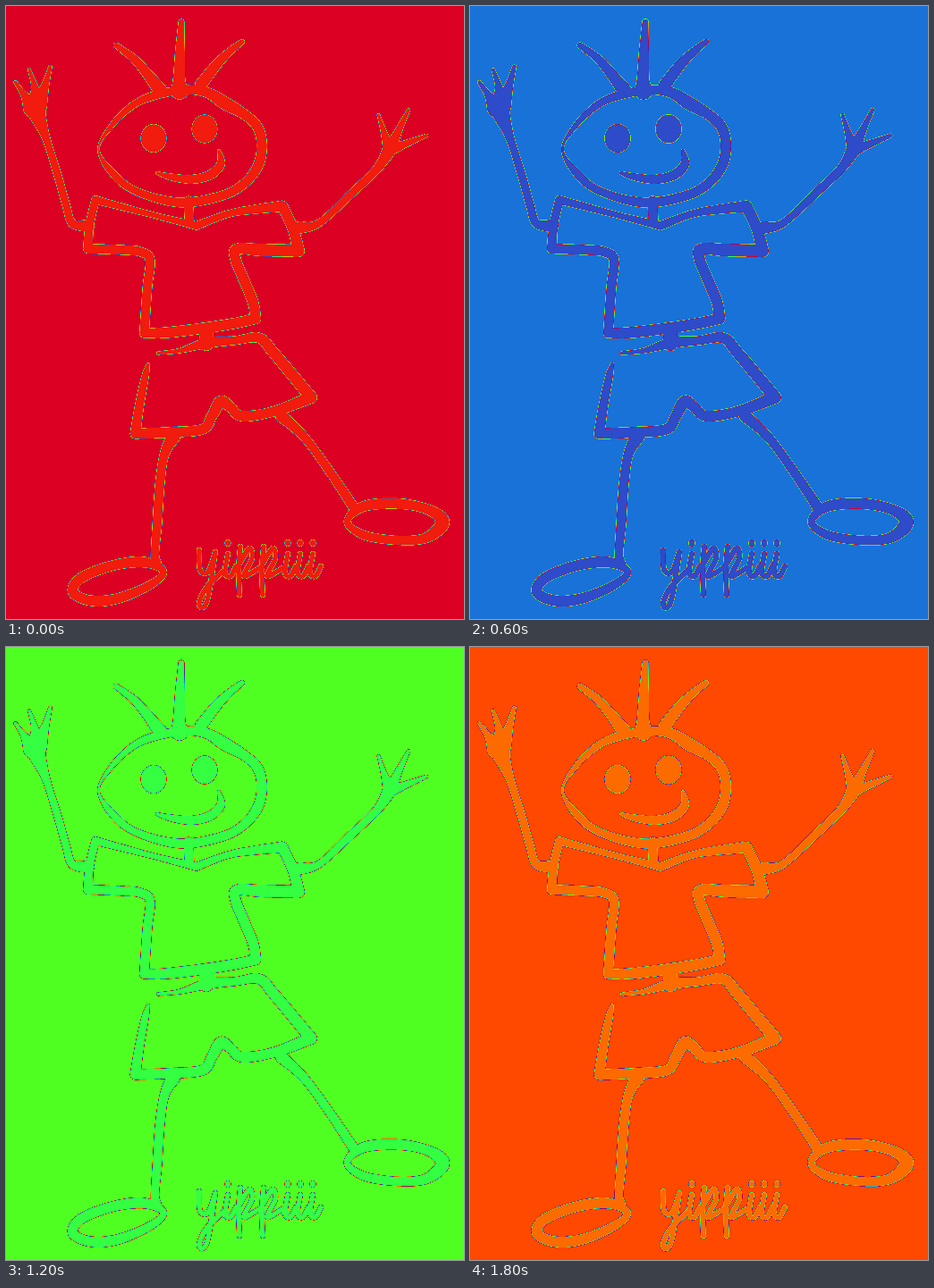
Recreate the animation shown at these times as an HTML page with a canvas. Size 512 px wide and 686 px high, loop 2000 ms.

```html
<!DOCTYPE html>
<html lang="en">
<head>
<meta charset="utf-8">
<title>yippiii</title>
<style>
  html, body { margin: 0; width: 100%; height: 100%; overflow: hidden; }
  canvas { display: block; }
</style>
</head>
<body>
<canvas id="stage" width="512" height="686" role="img" aria-label="Jumping stick child, yippiii"></canvas>
<script>
const W = 512, H = 686, STEP = 200;
const FIGURE_SHIFT = 0.45; // the figure trails the background on the colour wheel
const ctx = document.getElementById('stage').getContext('2d', { willReadFrequently: true });
const figure = new Path2D();

const wheel = 'dc0022 9c0466 5022aa 1872d8 04c8c8 1cf670 50ff22 aadd04 e89600 ff4800'
  .split(' ').map(hex => [0, 2, 4].map(i => parseInt(hex.slice(i, i + 2), 16)));

// Catmull-Rom between b and c, for points and colours alike.
const spline = (a, b, c, d, t) => b.map((v, k) => v + t / 2 * (c[k] - a[k] +
  t * (2 * a[k] - 5 * v + 4 * c[k] - d[k] + t * (3 * (v - c[k]) + d[k] - a[k]))));

function colorAt(pos) {
  const n = wheel.length, i = Math.floor(pos);
  const near = [-1, 0, 1, 2].map(k => wheel[(i + k + n) % n]);
  return spline(...near, pos - i).map(v => Math.round(Math.max(0, Math.min(255, v))));
}

function oval(x, y, rx, ry) {
  figure.moveTo(x + rx, y);
  figure.ellipse(x, y, rx, ry, 0, 0, 2 * Math.PI);
}

// Round brush along "x,y,radius" points; the radius carries over, "!" marks a sharp corner.
function brush(text, { closed = false, dx = 0, dy = 0 } = {}) {
  let radius = 3;
  const pts = text.trim().split(/\s+/).flatMap(token => {
    const [x, y, r = radius] = token.replace('!', '').split(',').map(Number);
    radius = r;
    const point = [x + dx, y + dy, r];
    return token.endsWith('!') ? [point, point] : [point];
  });
  const n = pts.length;
  const at = i => pts[closed ? (i + n) % n : Math.max(0, Math.min(n - 1, i))];
  for (let i = 0; i < (closed ? n : n - 1); i++) {
    const near = [-1, 0, 1, 2].map(k => at(i + k));
    const dabs = Math.ceil(Math.hypot(near[2][0] - near[1][0], near[2][1] - near[1][1]));
    for (let k = 0; k <= dabs; k++) {
      const [x, y, r] = spline(...near, k / (dabs || 1));
      oval(x, y, r, r);
    }
  }
}
const loop = text => brush(text, { closed: true });

function head() {
  loop(`200,94,5 167,100 142,111,4 118,134,3 103.5,161,1.5 121,189,4.5 147,208 195,220,5.5
    242,212 267,198 282,178,6 286,155 281,135 266,121 245,109,7.5 225,97,6`);
  brush('123,44,3.2 143,59,4.8 158,76,6 172,94,8');
  brush('196,18,3.5 194.5,50,5.5 193.5,82,7 194,95,10');
  brush('264,40,3 250,51,4.5 235,66,6 218,88,7');
  oval(165, 148, 14.5, 16);
  oval(222, 137.5, 14.5, 16);
  brush('169,187,2 185,191.5,4 207,194,5 228,189,5.5 240,177,5 238,162,2');
}

function shirt() {
  brush('204,218,5.5 205,243');
  loop(`100,217,4.8! 93.5,245,5 91.5,271.5,5.5! 130,273 150,275 161,284 158,315 154.5,366!
    185,365,6.2 245,357 279,350! 276,331 264,302 256.5,283 258,272 285,273,7 327,274!
    321,250,6.3 309,224! 275,228,5 247,233,4.2 213,246,4.8! 165,234,3.5`);
}

function arms() {
  brush('33,114,12 36,124,9 45.5,150,4.7 58,190 67,222 74,243,5 92,246,7');
  brush('10.5,85.5,2.2 20,99,4 30,114,11');
  brush('26,71.5,2 32,90,4 34,106,9');
  brush('49.5,68,2.3 44,88,4.5 36,112,10');
  brush('429,160,8 415,182,5.2 385,211,4.8 350,243,4.4 328,248,7');
  brush('416.5,122,2 422,140,3.5 428,158,7');
  brush('450,116.5,2.2 440,137,4 431,156,7');
  brush('470,145,2.2 450,153,4 433,160,6');
}

function shorts() {
  brush('224,362,8 224,378');
  brush(`170,388.5,2 195,385.5,3 225,377,6 255,374.5,5 283,371.5,6 300,389,6.5 341,438,7!
    300,453.5,6 264,459 251,449 240,443,7 230,459,6 220,473.5 185,477 144.5,478.5!
    149,448,5.3 155.5,415,4.3 159,401,2`);
}

function legs() {
  brush('187,482,8 177,502,5.5 172,535 169,580 166.5,612,4.8 168,624,6');
  loop('176,633,4 161,648,5 125,663,6 95,665.5 75,656 84,640 120,626 155,622.5');
  brush('308,459,7 334,483,5.3 362,521 388,560,6');
  loop('381.5,577,4 400,560,6 440,557 473,564 488,578,8 470,595,6 438,598,5.2 400,592');
}

function lettering() {
  brush('216,609 217,631 226,633 234,611');
  brush('234,611 226,661 220,673 216,668 224,651 242,633');
  for (const dx of [0, 26]) {
    brush('262,605 260,630 261,659', { dx });
    brush('261,624 272,607 275,618 266,638 283,629', { dx });
  }
  for (const x of [248, 315, 329, 343]) {
    brush('0,613 -3,634 3,638 9,627', { dx: x });
    oval(x, 601, 3.5, 4);
  }
}

[head, shirt, arms, shorts, legs, lettering].forEach(part => part());
ctx.fillStyle = '#fff';
ctx.fillRect(0, 0, W, H);
ctx.fillStyle = '#000';
ctx.filter = 'blur(0.4px)';
ctx.fill(figure);

const image = ctx.getImageData(0, 0, W, H);
const pixels = new Uint32Array(image.data.buffer);
const grays = Uint8Array.from(pixels, p => p & 255);

// Gray edge pixels run the long way round the wheel, giving the rainbow rim.
function paint(step) {
  const lut = Uint32Array.from({ length: 256 }, (_, gray) => {
    const [r, g, b] = colorAt(step + (wheel.length - FIGURE_SHIFT) * (1 - gray / 255));
    return 0xff000000 | b << 16 | g << 8 | r;
  });
  for (let i = 0; i < pixels.length; i++) pixels[i] = lut[grays[i]];
  ctx.putImageData(image, 0, 0);
}

let shown = -1;
function tick() {
  const step = Math.floor(performance.now() / STEP) % wheel.length;
  if (step !== shown) paint(shown = step);
  requestAnimationFrame(tick);
}
tick();
</script>
</body>
</html>
```
